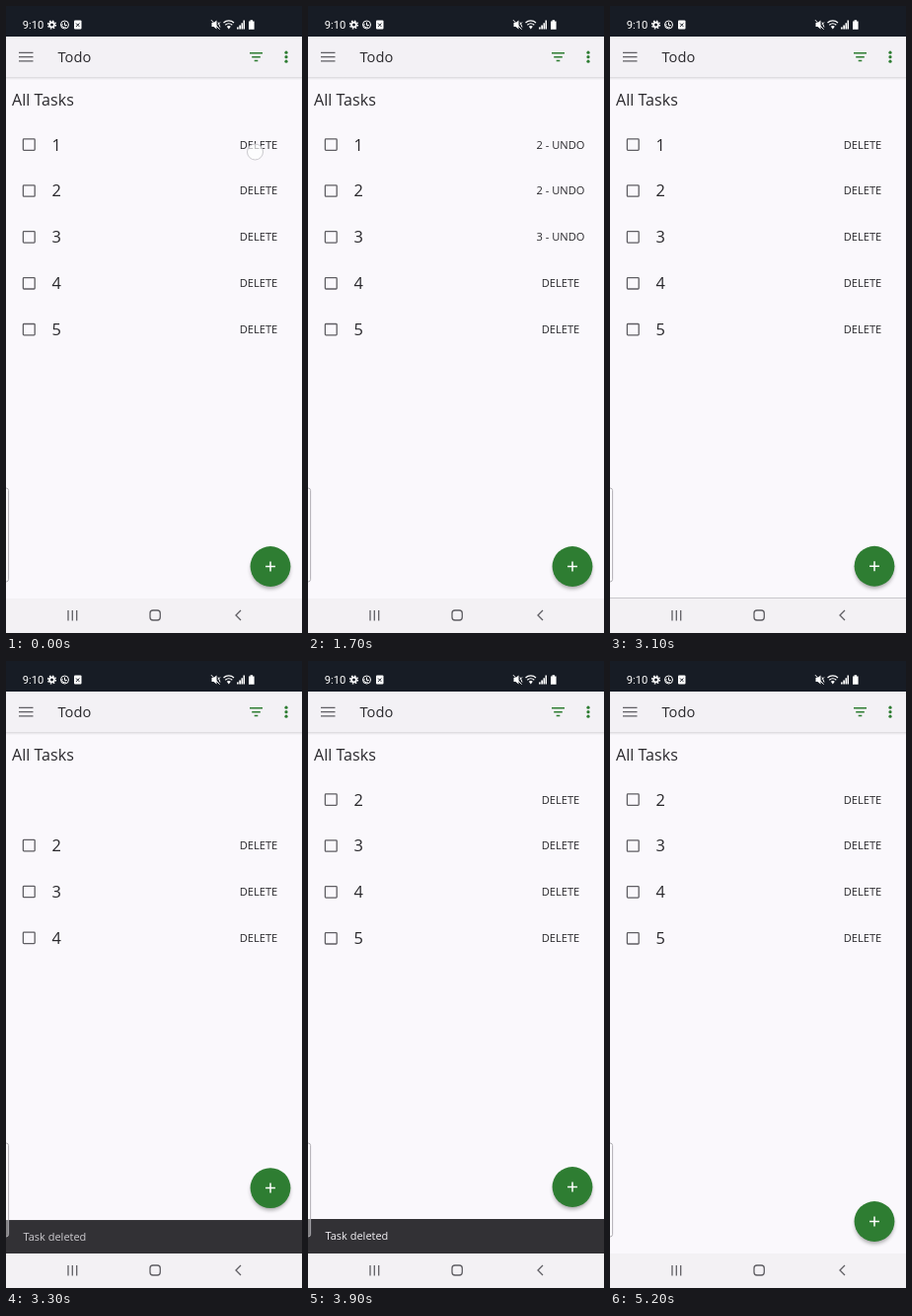
Write an HTML page that moves like this. It is 300x636 px and loops after 5.3 s.

```html
<!DOCTYPE html>
<html lang="en">
<head>
<meta charset="utf-8">
<title>Todo</title>
<style>
  html, body { margin: 0; width: 100%; height: 100%; overflow: hidden; background: #faf8fc; }
  svg { display: block; width: 100vw; height: 100vh; }
  text { font-family: "Open Sans", "Noto Sans", sans-serif; fill: #29282c; }
  .line { fill: none; stroke: #5f5e63; stroke-width: 1.3; }
  .label { font-size: 11.1px; text-anchor: middle; }
</style>
</head>
<body>
<svg viewBox="0 0 300 636">
  <defs>
    <filter id="blur" x="-50%" y="-50%" width="200%" height="200%"><feGaussianBlur stdDeviation="2.2"/></filter>
    <linearGradient id="shade" x2="0" y2="1">
      <stop stop-color="#000" stop-opacity=".13"/><stop offset="1" stop-color="#000" stop-opacity="0"/>
    </linearGradient>
    <clipPath id="listClip"><rect id="clipBox" y="117" width="300" height="235"/></clipPath>
  </defs>
  <rect width="300" height="636" fill="#faf8fc"/>

  <!-- app bar -->
  <rect y="31" width="300" height="41" fill="#f3f1f5"/>
  <rect y="72" width="300" height="3" fill="url(#shade)"/>
  <path class="line" d="M13 47.3h14.5M13 51.6h14.5M13 55.9h14.5"/>
  <text x="52.5" y="57" font-size="14.7">Todo</text>
  <path d="M247 47.7h13M249.2 51.7h8.6M251.7 55.6h3.6" stroke="#2e7d32" stroke-width="1.5"/>
  <g fill="#2e7d32"><circle cx="284" cy="47.2" r="1.6"/><circle cx="284" cy="51.7" r="1.6"/><circle cx="284" cy="56.2" r="1.6"/></g>
  <text x="6" y="101" font-size="16.1">All Tasks</text>

  <g id="list" clip-path="url(#listClip)"></g>

  <!-- snackbar -->
  <g id="snack">
    <rect y="566" width="300" height="36" fill="#323135"/>
    <text id="message" x="17.5" y="587" font-size="11" style="fill:#f2f0f4">Task deleted</text>
  </g>

  <g id="fab">
    <circle cx="268" cy="571.5" r="19.5" opacity=".35" filter="url(#blur)"/>
    <circle cx="268" cy="568.5" r="20.4" fill="#2e7d32"/>
    <path d="M263 568.5h10M268 563.5v10" stroke="#fff" stroke-width="1.5"/>
  </g>

  <!-- navigation bar -->
  <rect y="601" width="300" height="35" fill="#f3f1f4"/>
  <path class="line" d="M63 613v10.5M67.3 613v10.5M71.7 613v10.5M238 613l-5 5 5 5"/>
  <rect class="line" x="146" y="613" width="10.3" height="10" rx="3"/>

  <!-- status bar -->
  <rect width="300" height="31" fill="#171c25"/>
  <text x="16.7" y="23.3" font-size="11.2" style="font-family:Roboto,sans-serif;fill:#fff">9:10</text>
  <g fill="none" stroke="#fff">
    <circle cx="46.5" cy="19" r="2.4" stroke-width="1.8"/>
    <circle cx="46.5" cy="19" r="3.9" stroke-width="1.4" stroke-dasharray="1.6 1.463"/>
    <circle cx="59.5" cy="19" r="4" stroke-width="1"/>
    <path d="M59.5 16.5v3h2.3M57.3 18a2.3 2.3 0 0 0 3.5 3" stroke-width="1"/>
  </g>
  <rect x="69" y="14.6" width="7.5" height="9" rx="1" fill="#fff"/>
  <path d="M71 17.5l3.4 3.4M74.4 17.5l-3.4 3.4" stroke="#171c25"/>
  <g fill="#fff">
    <path d="M208.5 17h2l3-2.5v9l-3-2.5h-2z"/>
    <path d="M208 14.2l8.5 9.5M215 16.5l2 5M217 16.5l-2 2" stroke="#fff" stroke-width="1" fill="none"/>
    <path d="M220.5 17a7.5 7.5 0 0 1 10.5 0M222.3 19.2a5 5 0 0 1 7 0" fill="none" stroke="#fff" stroke-width="1.2"/>
    <path d="M223.8 20.8a3 3 0 0 1 4 0l-2 2.7z"/>
    <path d="M234 23.6v-2.2h1.7v2.2zM236.3 23.6v-4.2h1.7v4.2zM238.5 23.6v-6.4h1.5v6.4zM240.5 23.6v-9h1.5v9z"/>
    <path d="M246 15.5h1.5v-1.3h2.6v1.3h1.5v8.2h-5.6z"/>
  </g>

  <!-- edge panel handle -->
  <rect x="-6" y="489" width="8.6" height="95" rx="2.5" fill="#fff" fill-opacity=".4" stroke="#aaa9ad" stroke-width=".9"/>
  <circle id="touch" r="8" fill="#fff" fill-opacity=".65" stroke="#c4c3c8" stroke-width=".9"/>
</svg>
<script>
const LOOP = 5300, STEP = 100, PITCH = 46.9, SNACK = 35;
const $ = id => document.getElementById(id);
const clamp = x => Math.min(1, Math.max(0, x));
const ramp = (t, from, length) => clamp((t - from) / length);
const sine = x => (1 - Math.cos(Math.PI * x)) / 2;

// cubic-bezier(.4, 0, .2, 1), solved by bisection
function fastOut(x) {
  let lo = 0, hi = 1;
  for (let i = 0; i < 24; i++) {
    const s = (lo + hi) / 2, r = 1 - s;
    if (1.2 * r * r * s + 0.6 * r * s * s + s ** 3 < x) lo = s; else hi = s;
  }
  return 3 * (1 - lo) * lo * lo + lo ** 3;
}

// pending deletions: start and end of each countdown
const pending = [[100, 3100], [700, 2100], [1200, 2500]];
// touches: start, end, y
const touches = [[0, 200, 148], [600, 800, 190], [1100, 1400, 234], [2000, 2200, 190], [2400, 2600, 239.5]];

$('list').innerHTML = [1, 2, 3, 4, 5].map(n => `<g>
  <rect class="line" x="17.4" y="134.9" width="11.8" height="11.4" rx=".8"/>
  <text x="46.4" y="146.6" font-size="16.4">${n}</text>
  <text class="label" x="256" y="144.6"></text></g>`).join('');
const rows = [...$('list').children];

function label(i, t) {
  const [start, end] = pending[i] || [LOOP, LOOP];
  return t >= start && t < end ? `${3 - Math.floor((t - start) / 1000)} - UNDO` : 'DELETE';
}

function draw(t) {
  const lift = PITCH * sine(ramp(t, 3285, 250));
  rows.forEach((row, i) => {
    row.setAttribute('transform', `translate(0 ${i * PITCH - (i ? lift : 0)})`);
    row.lastElementChild.textContent = label(i, t);
  });
  rows[0].setAttribute('opacity', 1 - ramp(t, 3165, 120));
  $('clipBox').setAttribute('height', PITCH * (t < 3165 ? 5 : 4));

  const shown = fastOut(ramp(t, 3085, 275)) - fastOut(ramp(t, 4905, 250));
  $('snack').setAttribute('transform', `translate(0 ${SNACK * (1 - shown)})`);
  $('message').setAttribute('opacity', ramp(t, 3155, 180) - ramp(t, 4905, 180));
  $('fab').setAttribute('transform', `translate(0 ${-SNACK * shown})`);

  const hit = touches.find(([from, to]) => t >= from && t < to);
  $('touch').setAttribute('transform', `translate(252.5 ${hit ? hit[2] : -50})`);
}

// the screen refreshes ten times a second
const begin = performance.now();
function frame() {
  const t = (performance.now() - begin) % LOOP;
  draw(Math.floor(t / STEP) * STEP);
  requestAnimationFrame(frame);
}
frame();
</script>
</body>
</html>
```
